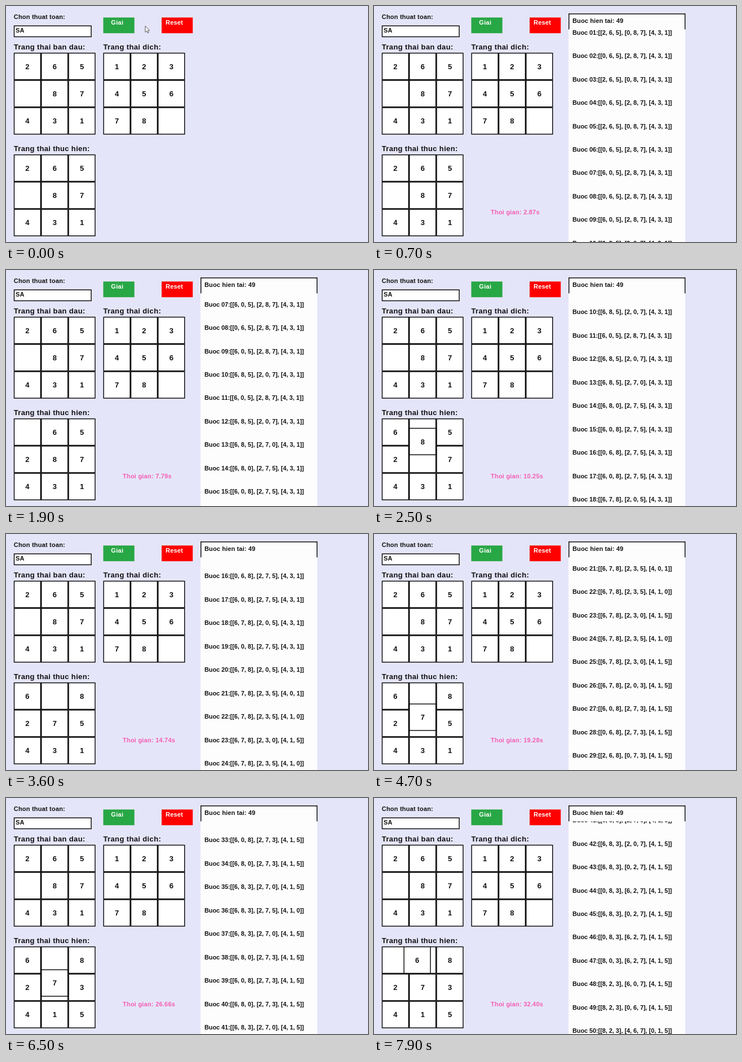
These frames come from a looping animation (642x418 px, 8000 ms). An HTML page with a canvas:

```html
<!DOCTYPE html>
<html lang="vi">
<head>
<meta charset="utf-8">
<style>
  html, body { margin: 0; width: 100%; height: 100%; overflow: hidden; background: #e5e5f9; }
  canvas { display: block; }
</style>
</head>
<body>
<canvas id="stage" width="642" height="418"></canvas>
<script>
const ctx = document.getElementById('stage').getContext('2d');
const LOOP = 8000, FRAME = 100;
const CELL = 48.3, BORDER = 1.4, LINE = 41.45, LIST_TOP = 41.4;
const STEP_SECONDS = 1.0102, SLIDE_SECONDS = 0.5, LEAD_SECONDS = 0.026;

// Moves of the blank square, from the first state to the last
const MOVES = 'UDUDURLRDUDRULLRDUDDRUDULULDUDURRDDUULRDLLUDURDLD';
const SHIFT = { U: -3, D: 3, L: -1, R: 1 };
const START = [2, 6, 5, 0, 8, 7, 4, 3, 1];
const GOAL = [1, 2, 3, 4, 5, 6, 7, 8, 0];

const states = [START];
for (const move of MOVES) {
  const next = states.at(-1).slice();
  const blank = next.indexOf(0), from = blank + SHIFT[move];
  [next[blank], next[from]] = [next[from], 0];
  states.push(next);
}

// [ms, solver seconds, scroll in wheel notches]
const KEYS = [
  [0, 0, 0], [600, 2.46, 0], [1300, 5.33, 9], [2500, 10.25, 26], [3600, 14.74, 44],
  [4700, 19.28, 60], [6500, 26.66, 95], [7900, 32.4, 121.55], [8000, 32.81, 121.55]
];

function sample(ms, column) {
  const i = Math.max(1, KEYS.findIndex(key => key[0] >= ms));
  const a = KEYS[i - 1], b = KEYS[i];
  return a[column] + (b[column] - a[column]) * (ms - a[0]) / (b[0] - a[0]);
}

function text(str, x, y, size = 11, spacing = 0.2, color = '#111', align = 'left') {
  ctx.font = `bold ${size}px "Liberation Sans", Arial, sans-serif`;
  ctx.letterSpacing = spacing + 'px';
  ctx.textAlign = align;
  ctx.fillStyle = color;
  ctx.fillText(str, x, y);
}

function rect(x, y, w, h, color) {
  ctx.fillStyle = color;
  ctx.fillRect(x, y, w, h);
}

function box(x, y, w, h) {
  rect(x, y, w, h, '#000');
  rect(x + BORDER, y + BORDER, w - 2 * BORDER, h - 2 * BORDER, '#fff');
}

function tile(x, y, value) {
  box(x, y, CELL, CELL);
  if (value) text(value, x + CELL / 2, y + CELL / 2 + 4.7, 13, 0, '#111', 'center');
}

const cellAt = i => [i % 3 * CELL, Math.floor(i / 3) * CELL];

function board(x, y, state, hidden) {
  state.forEach((value, i) => {
    const [dx, dy] = cellAt(i);
    tile(x + dx, y + dy, value === hidden ? 0 : value);
  });
}

function solverBoard(x, y, seconds) {
  const elapsed = seconds + LEAD_SECONDS;
  const step = Math.floor(elapsed / STEP_SECONDS);
  const progress = (elapsed - step * STEP_SECONDS) / SLIDE_SECONDS;
  if (step < 1) return board(x, y, START);
  const before = states[step - 1], after = states[step];
  if (progress >= 1) return board(x, y, after);
  const target = before.indexOf(0), source = after.indexOf(0);
  const [x0, y0] = cellAt(source), [x1, y1] = cellAt(target);
  board(x, y, before, before[source]);
  tile(x + x0 + (x1 - x0) * progress, y + y0 + (y1 - y0) * progress, before[source]);
}

function stepLabel(state, i) {
  const rows = [0, 3, 6].map(r => `[${state.slice(r, r + 3).join(', ')}]`);
  return `Buoc ${String(i + 1).padStart(2, '0')}:[${rows.join(', ')}]`;
}

function panel(notches) {
  const scroll = notches > 121 ? notches : Math.round(notches);
  rect(345, 13.8, 207, 405, '#fdfdfd');
  ctx.save();
  ctx.beginPath();
  ctx.rect(345, LIST_TOP, 207, 418);
  ctx.clip();
  states.forEach((state, i) => {
    const y = 64.6 + i * LINE - scroll * LINE / 3;
    if (y > 30 && y < 430) text(stepLabel(state, i), 352, y, 10.8, 0);
  });
  ctx.restore();
  rect(345, 13.3, 207, BORDER, '#000');
  rect(345, 13.3, BORDER, LIST_TOP - 13.3, '#000');
  rect(552.3 - BORDER, 13.3, BORDER, LIST_TOP - 13.3, '#000');
  text('Buoc hien tai: 49', 352, 29.6, 11, 0.13);
}

function cursor(x, y) {
  ctx.save();
  ctx.translate(x, y);
  ctx.beginPath();
  [[0, 0], [0, 11], [2.6, 8.6], [4.4, 12.4], [6, 11.6], [4.4, 8], [7.6, 7.8]]
    .forEach(p => ctx.lineTo(...p));
  ctx.closePath();
  ctx.fillStyle = '#fff';
  ctx.fill();
  ctx.strokeStyle = '#555';
  ctx.stroke();
  ctx.restore();
}

function draw(ms) {
  const seconds = sample(ms, 1);
  rect(0, 0, 642, 418, '#e5e5f9');
  text('Chon thuat toan:', 13.8, 22.8);
  box(13.8, 34.5, 138, 20.7);
  text('SA', 17, 46.9);
  rect(172.5, 20.4, 55.2, 27.8, '#28a745');
  text('Giai', 186.3, 33, 11, 0.3, '#fff');
  rect(276, 20.4, 55.2, 27.8, '#fe0000');
  text('Reset', 283, 33, 11, 0.2, '#fff');

  text('Trang thai ban dau:', 13.8, 76.6, 13, 0.37);
  board(13.8, 82.8, START);
  text('Trang thai dich:', 172.5, 76.6, 13, 0.37);
  board(172.5, 82.8, GOAL);
  text('Trang thai thuc hien:', 13.8, 256.6, 13, 0.33);
  solverBoard(13.8, 262.9, seconds);

  if (ms < FRAME) {
    cursor(247, 35.5);
  } else {
    text(`Thoi gian: ${seconds.toFixed(2)}s`, 207, 368.8, 11, 0.23, '#f45fb3');
    panel(sample(ms, 2));
  }
}

const begin = performance.now();
function tick() {
  const ms = (performance.now() - begin) % LOOP;
  draw(Math.floor((ms + 10) / FRAME) * FRAME % LOOP);
  requestAnimationFrame(tick);
}
tick();
</script>
</body>
</html>
```
